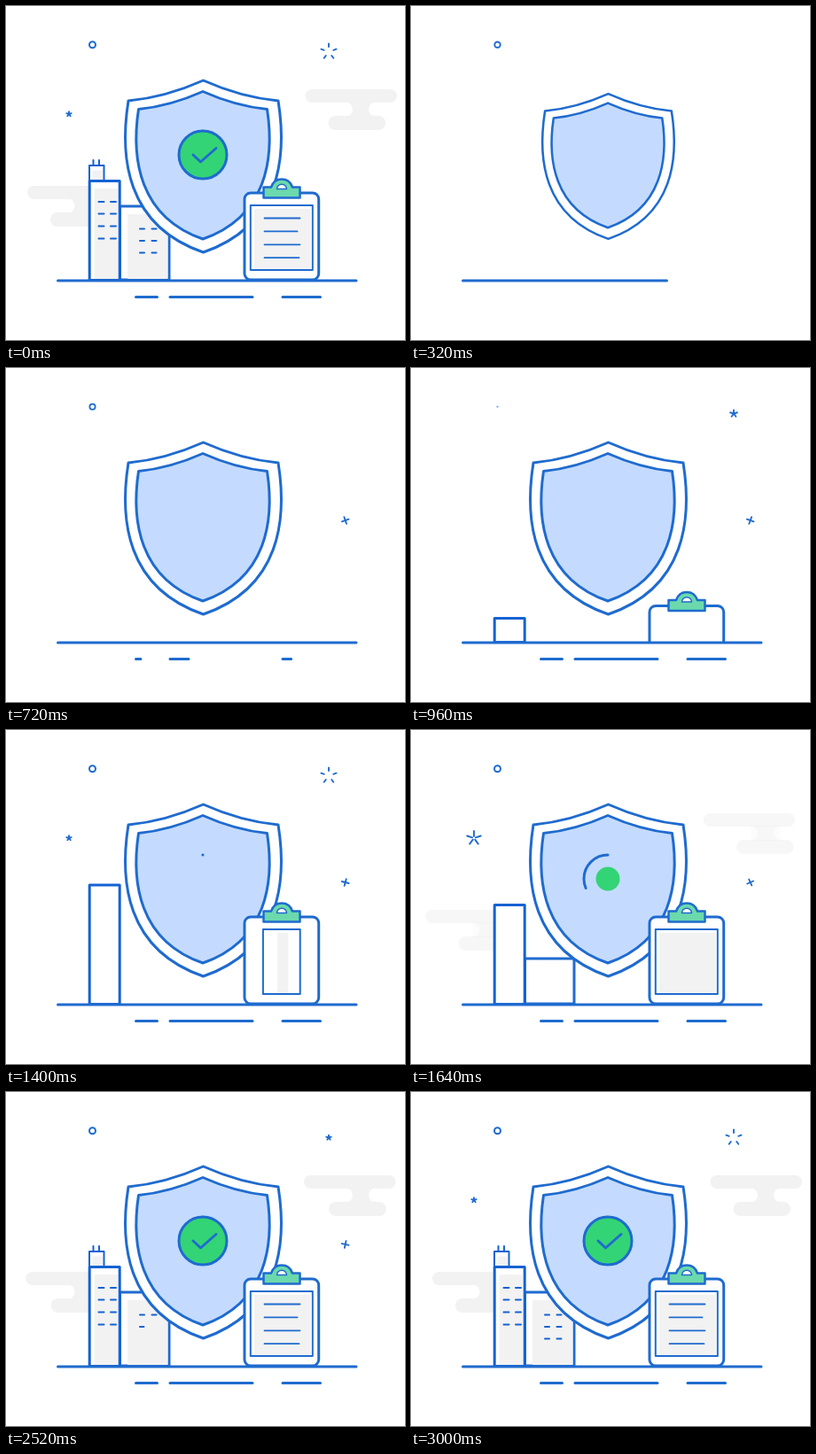
Write an HTML page with a canvas that moves like this. It is 450 px wide and 377 px high and loops after 3.04 s.

```html
<!DOCTYPE html>
<html lang="en">
<head>
<meta charset="utf-8">
<title>Shield and clipboard</title>
<style>
html, body { margin: 0; width: 100%; height: 100%; overflow: hidden; background: #fff; }
canvas { display: block; width: 450px; height: 377px; }
</style>
</head>
<body>
<canvas id="stage"></canvas>
<script>
const LOOP = 3040, STEP = 40;
const BLUE = '#1f6bcf', DEEP = '#1562d3', GREY = '#f2f2f2', SKY = '#c4dbff';
const GREEN = '#33d475', MINT = '#6bd9ac';

const canvas = document.getElementById('stage');
const ratio = window.devicePixelRatio || 1;
canvas.width = 450 * ratio;
canvas.height = 377 * ratio;
const c = canvas.getContext('2d');

const linear = x => x;
const smooth = x => x * x * (3 - 2 * x);
const easeOut = x => 1 - (1 - x) ** 2;
const mix = (a, b, p) => a + (b - a) * p;
let now = 0;

// Eased progress of the current time between two moments
function span(from, to, ease = smooth) {
  return ease(Math.min(1, Math.max(0, (now - from) / (to - from))));
}

// Piecewise linear value through [time, value] points
function track(points) {
  let value = points[0][1];
  for (let i = 1; i < points.length; i++) {
    const [t0, v0] = points[i - 1], [t1, v1] = points[i];
    if (now >= t0) value = mix(v0, v1, span(t0, t1, linear));
  }
  return value;
}

function paint(path, fill, stroke, width) {
  if (fill) { c.fillStyle = fill; c.fill(path); }
  if (stroke) { c.strokeStyle = stroke; c.lineWidth = width; c.stroke(path); }
}

function line(x0, y0, x1, y1, color, width) {
  c.strokeStyle = color;
  c.lineWidth = width;
  c.beginPath();
  c.moveTo(x0, y0);
  c.lineTo(x1, y1);
  c.stroke();
}

function growLine(x0, x1, y, p, color, width) {
  if (p > 0) line(x0, y, mix(x0, x1, p), y, color, width);
}

function box(x, y, w, h, fill, stroke, width) {
  const path = new Path2D();
  path.rect(x, y, w, h);
  paint(path, fill, stroke, width);
}

// Rectangle that opens sideways from its middle
function openBox(x, y, w, h, p, fill, stroke, width) {
  if (p > 0) box(x + w * (1 - p) / 2, y, w * p, h, fill, stroke, width);
}

function at(x, y, scale, draw) {
  if (scale <= 0) return;
  c.save();
  c.translate(x, y);
  c.scale(scale, scale);
  draw();
  c.restore();
}

const outerShield = new Path2D(
  'M222.5 84Q180 103 138 107C128 170 135 248 222.5 278C310 248 317 170 307 107Q265 103 222.5 84Z');
const innerShield = new Path2D(
  'M222 96.5Q185 113 149.5 116.5C141 172 150 238 222 263C294 238 303 172 294.5 116.5Q259 113 222 96.5Z');
const clipShape = new Path2D(
  'M290.5 216.5V204.5H299C301 198.5 305.5 195.5 311 195.5S321 198.5 323 204.5H331.5V216.5Z');
const clipHole = new Path2D('M305.5 206.5a5.5 5.2 0 0 1 11 0Z');

function pill(x, y, w, h) {
  c.fillStyle = GREY;
  c.beginPath();
  c.roundRect(x, y, w, h, h / 2);
  c.fill();
}

function cloud(x, y) {
  const rest = (1 - span(1500, 3000, linear)) ** 1.5;
  c.save();
  c.globalAlpha = span(1480, 1760);
  c.translate(x, y);
  box(45.5, 14, 34, 17, GREY);
  c.fillStyle = '#fff';
  for (const notch of [45.5, 79.5]) {
    c.beginPath();
    c.arc(notch, 22.5, 8, 0, 7);
    c.fill();
  }
  pill(-9 * rest, 0, 103.5, 15);
  pill(26 + 4 * rest, 30, 64.5, 16);
  c.restore();
}

// Windows light up one after another, two per row
function windows(columns, rows, width, start) {
  let i = 0;
  for (const y of rows) {
    for (const x of columns) {
      const from = start + 45 * i++;
      growLine(x, x + width, y, span(from, from + 45, linear), DEEP, 2);
    }
  }
}

function lowBuilding() {
  const h = 92 * span(1520, 1880, easeOut) - 9 * span(1920, 2160);
  if (h <= 0) return;
  box(128.5, 309 - h, 55.5, h, '#fff', BLUE, 3);
  openBox(137, 235, 45.5, 73, span(2100, 2320), GREY);
  windows([151, 164.5], [251.5, 265, 278.5], 5, 2390);
}

function tallBuilding() {
  const roof = 17.5 * span(1860, 2010);
  if (roof > 0) {
    box(94, 197.5 - roof, 16.5, roof, '#fff', DEEP, 2);
    if (roof > 6) box(97.5, 203 - roof, 11.5, roof - 6, GREY);
    const mast = 6 * span(2010, 2160);
    if (mast > 0) for (const x of [98.5, 105]) line(x, 180, x, 180 - mast, DEEP, 2);
  }
  const h = 134.5 * span(910, 1380, easeOut) - 22.5 * span(1400, 1640);
  if (h <= 0) return;
  box(94.2, 309.5 - h, 34, h, '#fff', DEEP, 3);
  openBox(99.5, 206, 26.5, 102, span(1640, 1860), GREY);
  windows([104.5, 118], [221, 234.5, 248.5, 262.5], 6, 1785);
}

function shield() {
  const scale = 1.14 * span(80, 440) - 0.14 * span(440, 645, linear);
  at(222.3, 181, scale, () => {
    c.translate(-222.3, -181);
    paint(outerShield, '#fff', BLUE, 3);
    paint(innerShield, SKY, BLUE, 3);
  });
}

function badge() {
  at(222, 168, span(1480, 1800), () => {
    c.fillStyle = GREEN;
    c.beginPath();
    c.arc(0, 0, 27, 0, 7);
    c.fill();
  });
  const turn = span(1390, 2060);
  if (turn > 0) {
    const top = -Math.PI / 2;
    c.strokeStyle = BLUE;
    c.lineWidth = 3;
    c.beginPath();
    c.arc(222, 168, 27, top, top - 2 * Math.PI * turn, true);
    c.stroke();
  }
  const tick = span(2040, 2320);
  if (tick > 0) {
    const down = Math.min(1, tick * 3), up = Math.max(0, tick * 1.5 - 0.5);
    c.lineWidth = 3;
    c.beginPath();
    c.moveTo(211, 168);
    c.lineTo(mix(211, 219.5, down), mix(168, 176, down));
    if (up > 0) c.lineTo(mix(219.5, 237, up), mix(176, 160.5, up));
    c.stroke();
  }
}

function clipboard() {
  const rise = span(780, 1140);
  if (rise <= 0) return;
  c.save();
  c.beginPath();
  c.rect(260, 180, 110, 130);
  c.clip();
  c.translate(0, 115 * (1 - rise));
  const body = new Path2D();
  body.roundRect(269, 211, 83.7, 98, 7);
  paint(body, '#fff', BLUE, 3);
  openBox(275.8, 225, 70, 73, span(1270, 1500), '#fff', BLUE, 2);
  openBox(280, 229, 64.5, 68, span(1330, 1580), GREY);
  [332, 329, 332, 331].forEach((end, i) => {
    const from = 1820 + 130 * i;
    growLine(291.5, end - 0.5, 239.5 + 14.9 * i, span(from, from + 190), BLUE, 1.8);
  });
  paint(clipShape, MINT, BLUE, 2.5);
  paint(clipHole, '#fff', BLUE, 1.5);
  c.restore();
}

function ground() {
  growLine(58.5, 395, 310, span(40, 680, easeOut), BLUE, 3);
  for (const [x0, x1] of [[146.5, 170.5], [185, 278], [312, 354.5]]) {
    growLine(x0, x1, 328.5, span(640, 900), BLUE, 3);
  }
}

function burst(x, y, start) {
  for (const begin of [start, start + 1600]) {
    const outer = 9 * span(begin, begin + 460, easeOut);
    const inner = 9 * span(begin + 180, begin + 800, linear);
    if (outer <= 0 || outer - inner < 0.3) continue;
    for (let k = 0; k < 5; k++) {
      const a = (k * 72 - 90) * Math.PI / 180;
      const dx = Math.cos(a), dy = Math.sin(a);
      line(x + dx * inner, y + dy * inner, x + dx * outer, y + dy * outer, BLUE, 1.9);
    }
  }
}

function ring() {
  const scale = span(120, 360) - span(680, 880) + span(920, 1240, easeOut);
  at(97.5, 43.7, scale, () => {
    c.strokeStyle = BLUE;
    c.lineWidth = 2;
    c.beginPath();
    c.arc(0, 0, 3.5, 0, 7);
    c.stroke();
  });
}

function cross() {
  const scale = track([[320, 0], [480, 1], [1400, 1], [1920, 0.88], [2520, 1], [2780, 1], [2940, 0]]);
  const angle = track([[320, 0], [560, 45], [960, 110], [1400, 195], [1920, 305], [2520, 372], [2940, 450]]);
  at(382.7, 172, scale, () => {
    c.rotate(angle * Math.PI / 180);
    line(-4, 0, 4, 0, BLUE, 1.9);
    line(0, -4, 0, 4, BLUE, 1.9);
  });
}

function draw(time) {
  // The loop opens on the finished picture, then clears
  now = time < STEP ? LOOP - STEP : time;
  c.setTransform(ratio, 0, 0, ratio, 0, 0);
  c.fillStyle = '#fff';
  c.fillRect(0, 0, 450, 377);
  c.lineCap = 'round';
  c.lineJoin = 'round';
  cloud(337.5, 94);
  cloud(24, 203);
  lowBuilding();
  tallBuilding();
  shield();
  badge();
  clipboard();
  ground();
  burst(364, 51.5, 840);
  burst(71, 122, 1320);
  ring();
  cross();
}

const begin = performance.now();
function tick() {
  const time = (performance.now() - begin) % LOOP;
  draw(Math.floor(time / STEP) * STEP);
  requestAnimationFrame(tick);
}
tick();
</script>
</body>
</html>
```
